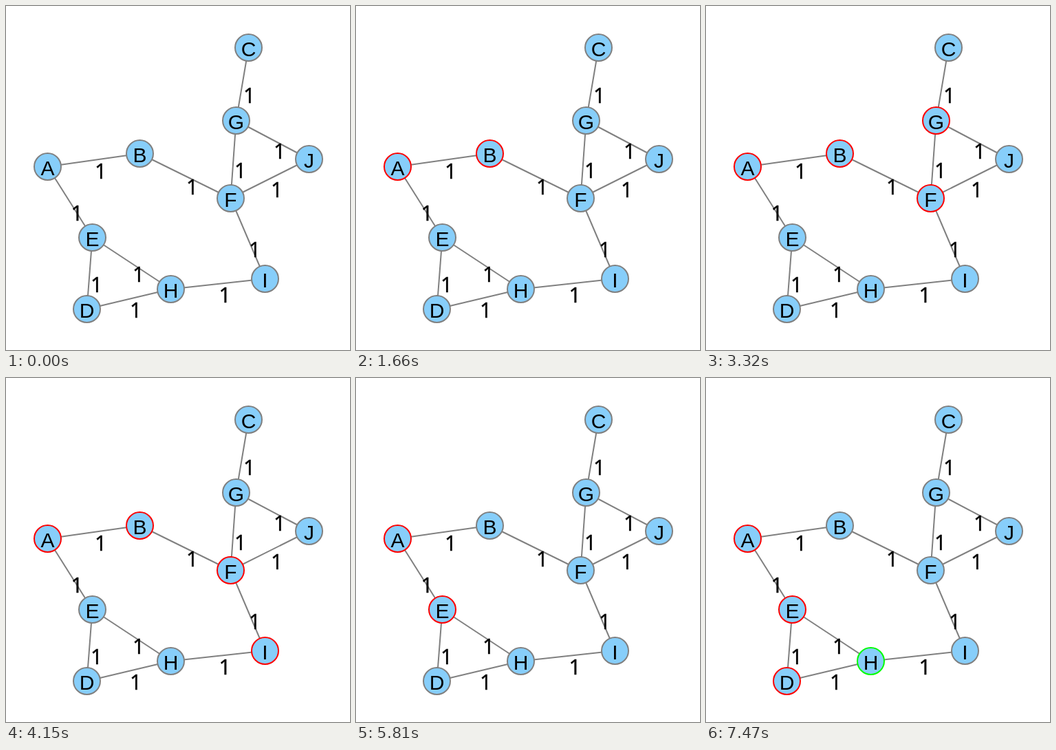
Write an HTML page that moves like this. It is 500x500 px and loops after 9130 ms.

```html
<!DOCTYPE html>
<html lang="en">
<head>
<meta charset="utf-8">
<title>Depth-first search</title>
<style>
  html, body { margin: 0; width: 100%; height: 100%; overflow: hidden; background: #fff; }
  svg { display: block; width: 100vw; height: 100vh; }
  line { stroke: #808080; stroke-width: 2; }
  circle { fill: #87cefa; stroke: #808080; stroke-width: 2; }
  text { font: 30px "Liberation Sans", Arial, sans-serif; text-anchor: middle; fill: #000; }
  .cost { font-family: "Noto Sans", sans-serif; stroke: #000; stroke-width: .3; }
</style>
</head>
<body>
<svg viewBox="0 0 500 500"><g id="stage" transform="translate(.5 .5)"></g></svg>
<script>
const nodes = {
  A: [60, 233], B: [194, 214], C: [352, 60], D: [117, 440], E: [125, 336],
  F: [326, 279], G: [334, 166], H: [239, 411], I: [376, 396], J: [440, 222]
};
const edges = ["AB", "AE", "BF", "CG", "GF", "GJ", "FJ", "FI", "ED", "EH", "DH", "HI"];

// Search stack at each step; the goal turns green.
const steps = ["", "A", "AB", "ABF", "ABFG", "ABFI", "ABFJ", "AE", "AED", "AEDH"];
const goal = "H";
const stepTime = 830, loopTime = 9130;

const stage = document.getElementById("stage");

function add(tag, attrs, text = "") {
  const el = document.createElementNS("http://www.w3.org/2000/svg", tag);
  for (const key in attrs) el.setAttribute(key, attrs[key]);
  el.textContent = text;
  return stage.appendChild(el);
}

const ends = edges.map(([a, b]) => [...nodes[a], ...nodes[b]]);
for (const [x1, y1, x2, y2] of ends) add("line", { x1, y1, x2, y2 });

const rings = {};
for (const name in nodes) {
  const [x, y] = nodes[name];
  rings[name] = add("circle", { cx: x, cy: y, r: 19.5 });
  add("text", { x, y: y + 12.5 }, name);
}

for (const [x1, y1, x2, y2] of ends) {
  add("text", { class: "cost", x: (x1 + x2) / 2 + 10, y: (y1 + y2) / 2 + 27 }, "1");
}

let shown = -1;
function draw(time) {
  const step = Math.min(Math.floor(time % loopTime / stepTime), steps.length - 1);
  if (step !== shown) {
    shown = step;
    for (const name in rings) {
      const active = steps[step].includes(name);
      rings[name].style.stroke = !active ? "#808080" : name === goal ? "#00ff00" : "#ff0000";
    }
  }
}

const start = performance.now();
function tick() {
  draw(performance.now() - start);
  requestAnimationFrame(tick);
}
draw(0);
requestAnimationFrame(tick);
</script>
</body>
</html>
```
